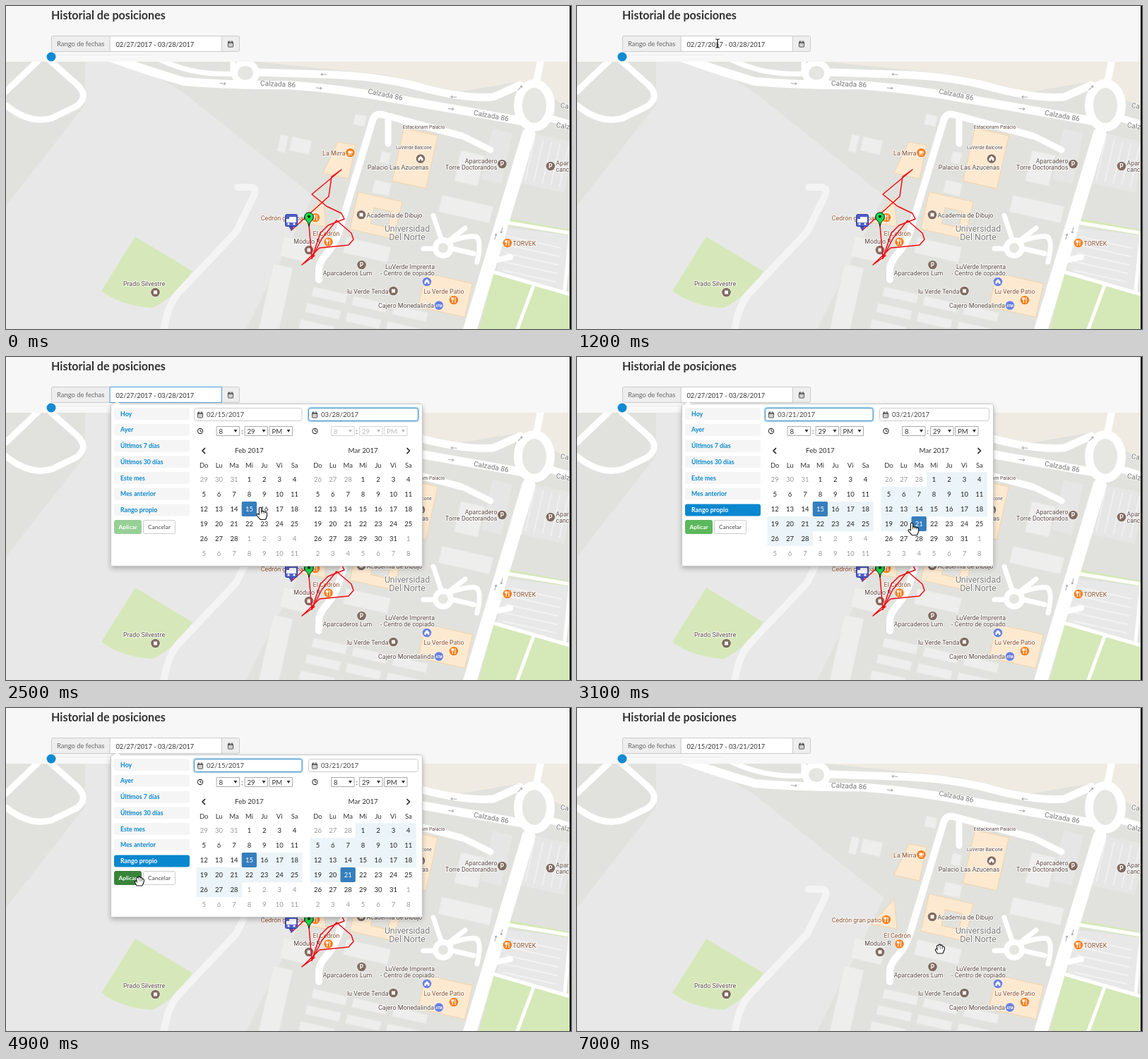
Write an HTML page with a canvas that moves like this. It is 800x458 px and loops after 7.1 s.

```html
<!DOCTYPE html>
<html lang="es">
<head>
<meta charset="utf-8">
<title>Historial de posiciones</title>
<style>
html, body { margin: 0; width: 100%; height: 100%; overflow: hidden; background: #f7f7f7; }
canvas { display: block; }
</style>
</head>
<body>
<canvas id="stage" width="800" height="458"></canvas>
<script>
const g = document.getElementById('stage').getContext('2d');
const LOOP = 7100, STEP = 100;
const UI = 'Lato, sans-serif', MAP = 'Roboto, sans-serif';
const OPEN = 1400, PICK_START = 2300, PICK_END = 3000, CLOSE = 5000, CLEAR = 5200;

// ---------- drawing helpers ----------
function fill(color, d, edge) {
  const path = new Path2D(d);
  g.fillStyle = color;
  g.fill(path);
  if (edge) { g.strokeStyle = edge; g.lineWidth = 1; g.stroke(path); }
}
function line(color, width, d) {
  g.strokeStyle = color;
  g.lineWidth = width;
  g.lineCap = g.lineJoin = 'round';
  g.stroke(new Path2D(d));
}
function box(x, y, w, h, color, edge, r = 0, edgeWidth = 1) {
  g.beginPath();
  g.roundRect(x, y, w, h, r);
  if (color) { g.fillStyle = color; g.fill(); }
  if (edge) { g.strokeStyle = edge; g.lineWidth = edgeWidth; g.stroke(); }
}
function oval(x, y, rx, ry, color, edge, width) {
  g.beginPath();
  g.ellipse(x, y, rx, ry, 0, 0, 7);
  if (color) { g.fillStyle = color; g.fill(); }
  if (edge) { g.strokeStyle = edge; g.lineWidth = width; g.stroke(); }
}
const disc = (x, y, r, color) => oval(x, y, r, r, color);
function text(str, x, y, font, color, align = 'left', halo) {
  g.font = font;
  g.textAlign = align;
  if (halo) {
    g.strokeStyle = halo;
    g.lineWidth = 2;
    g.lineJoin = 'round';
    g.strokeText(str, x, y);
  }
  g.fillStyle = color;
  g.fillText(str, x, y);
}
function at(x, y, draw, angle = 0) {
  g.save();
  g.translate(x, y);
  g.rotate(angle);
  draw();
  g.restore();
}

// ---------- map ----------
const BROWN = '#806a60', ORANGE = '#f5801f', BLUE = '#6a80df';
const GROUND = '#e1e2dd', TILT = .22;

function label(str, x, y, align = 'left', color = '#5b4a44', size = 8.9) {
  text(str, x, y, size + 'px ' + MAP, color, align, 'rgba(255,255,255,.8)');
}
// Buildings share the slant of the campus.
function block(x, y, w, h, color = '#eeeeec', edge = '#e7e7e4') {
  at(x, y, () => box(-w / 2, -h / 2, w, h, color, edge), TILT);
}
const warmBlock = (x, y, w, h) => block(x, y, w, h, '#fce9d0', '#f3d3aa');

const glyphs = {
  park: () => text('P', 0, 3, 'bold 8.5px ' + MAP, '#fff', 'center'),
  place: () => box(-2.5, -2.5, 5, 5, '#fff'),
  food: () => line('#fff', 1.1, 'M-1.700-3.500V3.500M-3-3.500V-1H-.4V-3.500M2 3.500V-3.500'),
  cup: () => { box(-3, -2.5, 4.5, 4, '#fff', null, 1); line('#fff', .9, 'M1.500-1.700H3V.3H1.500M-3 3H2'); },
  hall: () => fill('#fff', 'M-3.500-.5 0-4 3.500-.5V3H1V1H-1V3H-3.500Z'),
  atm: () => text('ATM', 0, 2, 'bold 4.6px ' + MAP, '#fff', 'center'),
};
// A pin with its name beside, above or below it; "|" breaks the name.
function poi(name, x, y, glyph, color, side, dx = -3) {
  const rows = name.split('|'), ink = color === ORANGE ? '#8c4f2b' : undefined;
  const beside = { left: [-7, 'right'], right: [7.5, 'left'] }[side];
  const [shift, align] = beside || [dx, 'center'];
  const top = beside ? 3.5 - (rows.length - 1) * 4.5 : side === 'below' ? 15 : -9 * rows.length;
  rows.forEach((row, i) => label(row, x + shift, y + top + i * 9, align, ink));
  disc(x, y, 7, 'rgba(255,255,255,.7)');
  disc(x, y, 6.3, color);
  at(x, y, glyphs[glyph]);
}
function street(name, x, y, angle, align = 'center') {
  at(x, y, () => label(name, 0, 3, align, '#777', 10.1), angle);
}
function arrow(x, y, angle) {
  at(x, y, () => line('#aaa', 1, 'M-4 0H4M2-1.500 4 0 2 1.500'), angle);
}

function drawGround() {
  box(0, 79, 800, 379, GROUND);
  fill('#e8e8e8', 'M0 283 112 140V79H180L250 122 435 269 340 458H0Z');
  fill('#f0ebe2', 'M355 79H800V145L728 107 640 122 540 98Z');
  fill('#d6e8b9', 'M183 327 264 376Q240 412 208 428 165 426 135 404Z');
  fill('#d5e8b7', 'M712 301 800 318V326L708 310ZM690 380 800 411V458H670Z');
  fill('#e8e8e8', 'M703 314 798 325 790 405 695 377Z');
  block(695, 213, 28, 72, '#e5e6e5');
  block(765, 222, 66, 72, '#e5e6e5');
  for (let i = 0; i < 5; i++) {
    block(742 + i * 12, 217 + i * 2.5, 1, 60, '#efefef', '#efefef');
    block(749 - i * 2, 335 + i * 12, 76, 1, '#f2f2f2', '#f2f2f2');
  }
}

function drawBuildings() {
  block(392, 195, 11, 24);
  block(417, 198, 28, 20);
  block(501, 162, 16, 15);
  block(537, 215, 13, 16);
  block(532, 258, 24, 18);
  block(651, 288, 74, 24);
  block(656, 230, 34, 44);
  block(511, 346, 64, 22);
  block(412, 345, 44, 29);
  block(382, 415, 28, 95);
  for (let row = 0; row < 3; row++)
    for (let col = 0; col < 3; col++)
      block(458 + col * 57 - row * 9, 410 + row * 23 + col * 13, 49, 13);
  warmBlock(579, 216, 49, 77);
  warmBlock(524, 297, 64, 54);
  block(531, 300, 25, 23, GROUND, '#f3d3aa');
  warmBlock(622, 410, 68, 49);
  fill('#fce9d0', 'M470 193 495 197 485 245 449 237Z M449 271 453 313 417 307Z', '#f3d3aa');
}

function drawRoads() {
  const w = '#fff';
  line('#f4f4f4', 10, 'M328 257H348Q356 259 350 271L326 320 243 408Q228 426 223 462');
  line(w, 9, 'M45 78 0 121M63 78 99 110Q119 127 100 142L65 159Q34 168 0 141');
  line(w, 12, 'M145 72Q200 92 252 107 320 113 400 112 480 118 560 133L730 163');
  line(w, 7, 'M218 76Q265 99 322 96M321 79V94');
  line(w, 11, 'M358 94 450 97Q530 99 590 116 650 132 690 129L728 112');
  line(w, 10, 'M751 108 757 78M770 159 803 169');
  oval(339, 95, 15.5, 14.5, '#e5e5e1', w, 9);
  oval(748, 141, 23, 31, '#e6e6e2', w, 12);
  line(w, 19, 'M740 182 655 465');
  line(w, 10, 'M443 388V372Q444 362 455 350T473 315L518 166Q521 151 533 154L645 184');
  line(w, 9, 'M541 162V195M650 186 686 204');
  line(w, 7, 'M591 344H607M616 330 605 297M632 344 662 351M631 333Q654 325 666 327 674 334 667 363M628 332 650 315');
  oval(619, 343, 11, 11, '#e5e5e1', w, 8);
  line(w, 5, 'M709 307 799 322 791 405M693 378 799 409M747 396 724 458');
  line(w, 8, 'M686 362 714 356');
}

function drawLabels() {
  street('Calzada 86', 385, 111, .05);
  street('Calzada 86', 537, 126, .2);
  street('Calzada 86', 687, 156, .18);
  street('Ca', 785, 141, .15, 'left');
  street('Calz', 779, 169, .15, 'left');
  for (const x of [450, 634]) arrow(x, 97 + (x - 450) * .174, 3.2);
  for (const x of [307, 443, 630]) arrow(x, 110 + ((x - 307) / 54) ** 2, .1);
  arrow(728, 116, -.8);
  arrow(693, 327, -1.3);
  arrow(702, 318, 1.8);

  label('Universidad', 568, 320, 'center', '#7c7c7c', 12.3);
  label('Del Norte', 568, 332, 'center', '#7c7c7c', 12.3);
  label('Estacionam Palacio', 591.5, 174, 'center', undefined, 6.8);
  label('LuVerde Balcone', 577.5, 203, 'center', undefined, 6.8);

  poi('La Mirra', 487.5, 208, 'cup', ORANGE, 'left');
  poi('Palacio Las Azucenas', 587, 216.5, 'hall', BROWN, 'below', -32);
  poi('Aparcadero|Torre Doctorandos', 702.5, 224, 'park', BROWN, 'left');
  poi('Apar|canc', 771, 227, 'park', BROWN, 'right');
  poi('Academia de Dibujo', 503, 296, 'place', BROWN, 'right');
  poi('Cedrón gran patio', 438, 300, 'food', ORANGE, 'left');
  poi('El Cedrón', 456.5, 334.5, 'food', ORANGE, 'above');
  poi('Módulo R', 429, 346, 'place', BROWN, 'above');
  poi('TORVEK', 710, 336, 'food', ORANGE, 'right');
  poi('Aparcaderos Lum', 503.5, 367, 'park', BROWN, 'below', -20);
  poi('LuVerde Imprenta|- Centro de copiado...', 596, 391, 'hall', BLUE, 'above', -24);
  poi('Prado Silvestre', 211.5, 406, 'place', BROWN, 'above', -16);
  poi('lu Verde Tenda', 548.5, 404, 'place', BROWN, 'left');
  poi('Lu Verde Patio', 634, 417, 'food', ORANGE, 'above', -14);
  poi('Cajero Monedalinda', 613, 424.5, 'atm', BLUE, 'left');
}

function drawRoute() {
  line('#f00a14', 1.5, 'M404 318 457 270 461 242 475 232 433 267 454 284 475 294 479 302 456 311 445 322 433 358 429 311');
  line('#f00a14', 1.5, 'M433 358 447 330 468 304 489 322 492 331 485 339 444 343 419 367 437 354');
  fill('#4450b8', 'M400 312H408L404 319Z');
  box(395.5, 295.5, 17, 17, '#4f5fc9', '#333f9c', 2);
  box(401, 299, 10, 8, '#fff', null, 1);
  box(397, 302, 4, 5, '#fff');
  for (const x of [400, 408]) disc(x, 309, 1.6, '#fff');
  fill('#14df4c', 'M429 312Q428 306 424.500 303.500A6.300 6.300 0 1 1 433.500 303.500Q430 306 429 312Z', '#111');
  disc(429, 298.5, 2, '#111');
}

// ---------- header ----------
function calendarIcon(x, y) {
  at(x, y, () => {
    box(-3.5, -3, 7, 7, '#fff', '#444', .5);
    line('#444', 1, 'M-3.500-1.500H3.500M-2-4.500v2M2-4.500v2');
    line('#888', .6, 'M-1.200-1v5M1.200-1v5M-3 1.200h6');
  });
}
function drawHeader(t) {
  box(0, 0, 800, 79, '#f7f7f7');
  text('Historial de posiciones', 64, 19, 'bold 16.1px ' + UI, '#333');
  box(64.5, 42.5, 266, 22, '#eee', '#ccc', 2);
  const focused = t >= OPEN - 100 && t < PICK_END;
  box(147.5, 42.5, 158, 22, '#fff', focused ? '#4c9bd6' : '#ccc');
  text('Rango de fechas', 72, 57, '9.4px ' + UI, '#666');
  text(t < CLOSE ? '02/27/2017 - 03/28/2017' : '02/15/2017 - 03/21/2017', 155.5, 57.5, '9.25px ' + UI, '#333');
  calendarIcon(318, 54);
  box(64, 69, 141, 5, '#f9f9f9');
  box(64, 69, 141, 1, '#ececec');
  disc(64, 72, 6.5, '#128ad1');
}

// ---------- date picker ----------
const COL = 21.4, ROW = 20.9, GRID_Y = 163.3;
const day = (month, date) => +new Date(2017, month, date);
const months = [
  { name: 'Feb 2017', x: 269.5, month: 1, firstDate: -2 },
  { name: 'Mar 2017', x: 430.7, month: 2, firstDate: -2 },
];
const ranges = ['Hoy', 'Ayer', 'Últimos 7 días', 'Últimos 30 días', 'Este mes', 'Mes anterior', 'Rango propio'];
const cellDay = (m, i) => day(m.month, m.firstDate + i);
const show = d => {
  const date = new Date(d), two = n => String(n).padStart(2, '0');
  return `${two(date.getMonth() + 1)}/${two(date.getDate())}/2017`;
};

function hoveredDay(t, p) {
  if (t >= PICK_START && t < PICK_START + 300) return null;
  for (const m of months) {
    const col = Math.floor((p.x - m.x) / COL), row = Math.floor((p.y - GRID_Y) / ROW);
    if (col >= 0 && col < 7 && row >= 0 && row < 6) return cellDay(m, row * 7 + col);
  }
  return null;
}
function dateField(x, w, value, active) {
  if (active) box(x, 72, w, 19, null, 'rgba(80,160,215,.35)', 3, 3);
  box(x + .5, 72.5, w - 1, 18, '#fff', active ? '#3b8fc4' : '#ccc', 3);
  calendarIcon(x + 9, 82);
  text(value, x + 18, 85, '9.6px ' + UI, '#444');
}
function timeRow(x, on) {
  oval(x, 105, 3.6, 3.6, null, '#333', 1.1);
  line('#333', 1, `M${x} 103V105.300H${x + 1.8}`);
  const ink = on ? '#333' : '#bbb';
  ['8', '29', 'PM'].forEach((value, i) => {
    const left = x + 23.5 + i * 37.5 + (i === 1 ? 2.5 : 0);
    box(left, 98.5, 32, 13, '#fff', on ? '#aaa' : '#d5d5d5');
    text(value, left + 3, 108.5, '9.6px ' + UI, ink);
    fill(ink, `M${left + 24} 103h5l-2.500 4Z`);
  });
  text(':', x + 58, 108.5, '9.6px ' + UI, '#333');
}
function drawMonth(m, start, end, hover) {
  const center = i => m.x + (i + .5) * COL;
  text(m.name, center(3), 136, '9.7px ' + UI, '#333', 'center');
  ['Do', 'Lu', 'Ma', 'Mi', 'Ju', 'Vi', 'Sa'].forEach((name, i) =>
    text(name, center(i), 157, '9.5px ' + UI, '#333', 'center'));
  for (let i = 0; i < 42; i++) {
    const d = cellDay(m, i), date = new Date(d);
    const x = m.x + i % 7 * COL, y = GRID_Y + Math.floor(i / 7) * ROW;
    const inside = date.getMonth() === m.month;
    const picked = inside && (d === start || d === end);
    if (picked) box(x, y, COL, ROW, '#357ebd', null, 2);
    else if (d === hover) box(x, y, COL, ROW, '#eee', null, 2);
    else if (inside && d > start && d < (end || hover)) box(x, y, COL + .3, ROW + .3, '#ebf4f8');
    text(date.getDate(), center(i % 7), y + 14, '9.5px ' + UI,
      picked ? '#fff' : inside ? '#222' : '#999', 'center');
  }
}
function drawPicker(t, p) {
  const start = t < PICK_START ? day(1, 27) : day(1, 15);
  const end = t < PICK_START ? day(2, 28) : t < PICK_END ? null : day(2, 21);
  const hover = hoveredDay(t, p);
  const chosen = t < PICK_START ? 3 : t < PICK_END ? -1 : 6;

  g.save();
  g.shadowColor = 'rgba(0,0,0,.25)';
  g.shadowBlur = 7;
  g.shadowOffsetY = 3;
  box(148, 66, 442, 231, '#fff', null, 3);
  g.restore();
  box(148.5, 66.5, 441, 230, '#fff', '#c6c6c6', 3);
  fill('#fff', 'M153 67 157.500 62.500 162 67Z');

  ranges.forEach((name, i) => {
    const y = 72 + i * 22.75, on = i === chosen;
    box(153, y, 107, 17, on ? '#0a88cf' : '#f5f5f5', null, 3);
    text(name, 162, y + 11.7, 'bold 8.8px ' + UI, on ? '#fff' : '#0a88cc');
  });
  const apply = !end ? '#97d097' : t >= 4600 ? '#398439' : '#5cb85c';
  box(153.5, 231.5, 38, 19, apply, apply, 2);
  text('Aplicar', 172.5, 244, 'bold 8.3px ' + UI, '#fff', 'center');
  box(194.5, 231.5, 45, 19, '#fff', '#ccc', 2);
  text('Cancelar', 217, 244, '8.4px ' + UI, '#444', 'center');

  dateField(266, 153.5, show(end && hover || start), !!end);
  dateField(428, 156, show(end || hover || day(2, 28)), !end);
  timeRow(275, true);
  timeRow(437.5, !!end);
  line('#222', 1.7, 'M281.500 129.500 278 133 281.500 136.500M568 129.500 571.500 133 568 136.500');
  for (const m of months) drawMonth(m, start, end, hover);
}

// ---------- mouse ----------
// Each stop is reached at its time, after a glide of at most 700 ms.
const stops = [
  [0, 420, 480], [1100, 199, 53], [PICK_START, 346, 214], [2500, 360, 213],
  [2900, 484, 235], [3700, 305, 238], [4600, 189, 246], [7000, 514, 342],
];
function mouse(t) {
  const next = stops.findIndex(s => s[0] > t);
  const [t1, x1, y1] = stops.at(next);
  const [t0, x0, y0] = stops.at(next < 0 ? -1 : next - 1);
  const glide = Math.min(700, t1 - t0);
  const u = glide ? Math.max(0, 1 - (t1 - t) / glide) : 1, e = u * u * (3 - 2 * u);
  return { x: x0 + (x1 - x0) * e, y: y0 + (y1 - y0) * e };
}
function fingers(d, palm) {
  line('#111', 4.2, d);
  line('#fff', 2, d);
  fill('#fff', palm);
}
const cursors = {
  beam: () => line('#222', 1.2, 'M-2.500-6Q0-6 0-4.500V5Q0 6-2.500 6M2.500-6Q0-6 0-4.500M0 5Q0 6 2.500 6M-1.500 2H1.500'),
  pointer: () => fingers('M0 1.500V10M2.800 7V10M5.400 7.500V10M8 8.500V12L6.500 16H1L-3.500 11', 'M0 9H8V13L6.500 16H1L-2 12Z'),
  hand: () => fingers('M-5 1-3 4.500H3L4.800 0V-2.200M2.200-4.300V2M-.4-5.300V2M-3-4-2 2', 'M-3 0H4.500L3 5H-3Z'),
};
function drawMouse(t, p, open) {
  const kind = p.y < 66 ? 'beam' : open && t < 4900 ? 'pointer' : 'hand';
  at(p.x, p.y, cursors[kind]);
}

// ---------- loop ----------
function render(now) {
  const t = Math.floor(now % LOOP / STEP) * STEP;
  const p = mouse(t), open = t >= OPEN && t < CLOSE;
  drawGround();
  drawBuildings();
  drawRoads();
  drawLabels();
  if (t < CLEAR) drawRoute();
  drawHeader(t);
  if (open) drawPicker(t, p);
  box(798, 0, 2, 458, '#111');
  drawMouse(t, p, open);
}
const begin = performance.now();
function tick() {
  render(performance.now() - begin);
  requestAnimationFrame(tick);
}
tick();
</script>
</body>
</html>
```
